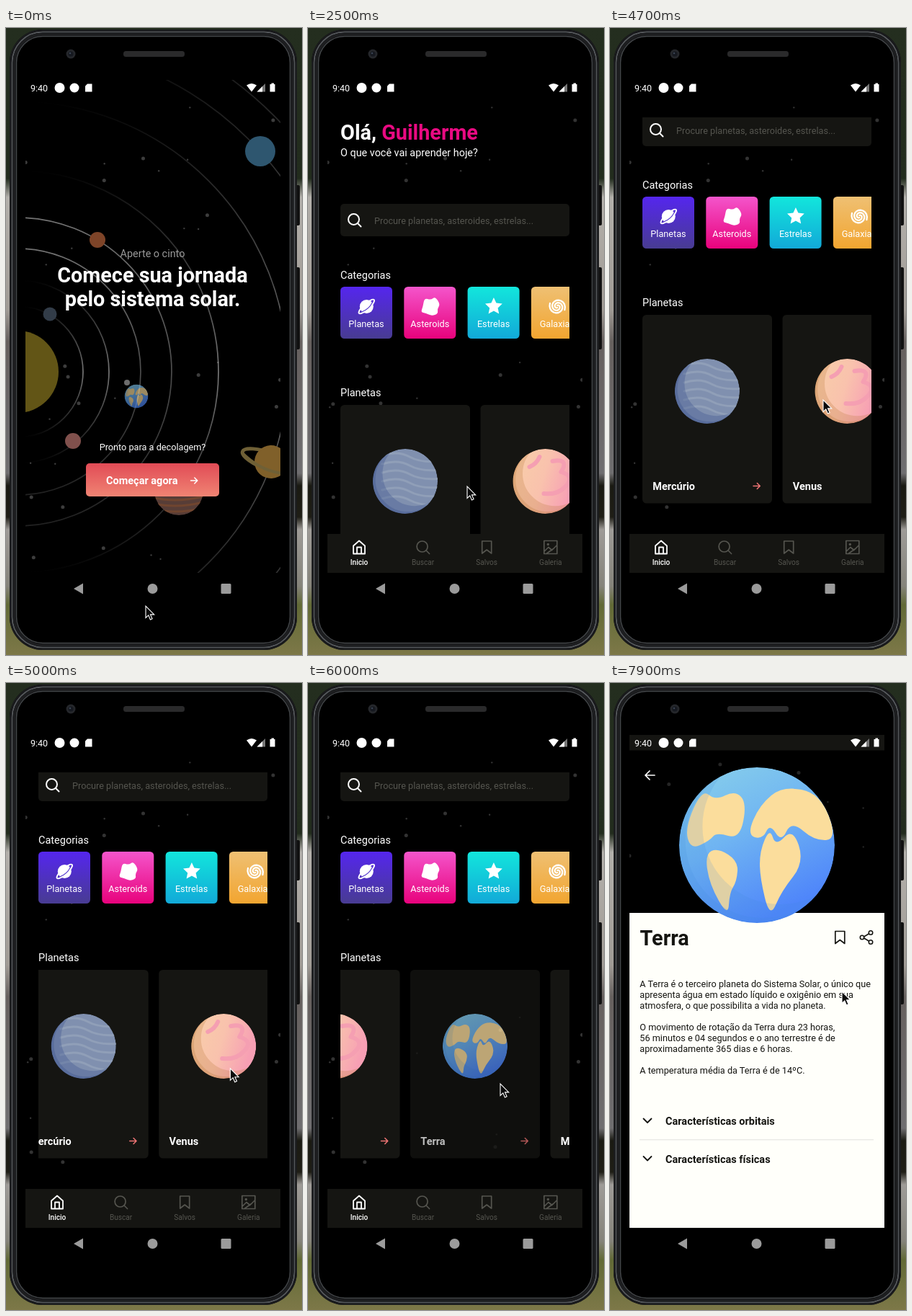
Recreate the animation shown at these times as an HTML page. Size 411 px wide and 870 px high, loop 8 s.

```html
<!DOCTYPE html>
<html lang="pt">
<head>
<meta charset="utf-8">
<title>Sistema solar</title>
<style>
html, body { margin: 0; width: 100%; height: 100%; overflow: hidden; background: #000; }
svg { display: block; width: 411px; height: 870px; font-family: Roboto, "Noto Sans", sans-serif; }
text { white-space: pre; }
</style>
</head>
<body>
<script>
const DARK = '#151512', INK = '#151511', PAPER = '#fffffa', GREY = '#55554f';

// ---------- drawing helpers ----------
const text = (x, y, size, str, fill = '#fff', weight = 400, anchor = 'start') =>
  `<text x="${x}" y="${y}" font-size="${size}" fill="${fill}" font-weight="${weight}" text-anchor="${anchor}">${str}</text>`;
const rect = (x, y, w, h, fill, r = 0, more = '') =>
  `<rect x="${x}" y="${y}" width="${w}" height="${h}" rx="${r}" fill="${fill}" ${more}/>`;
const disc = (x, y, r, fill, more = '') => `<circle cx="${x}" cy="${y}" r="${r}" fill="${fill}" ${more}/>`;
const ring = (x, y, r, color, w, more = '') => disc(x, y, r, 'none', `stroke="${color}" stroke-width="${w}" ${more}`);
const line = (d, color = '#fff', w = 1.8) =>
  `<path d="${d}" fill="none" stroke="${color}" stroke-width="${w}" stroke-linecap="round" stroke-linejoin="round"/>`;
const fill = (d, color) => `<path d="${d}" fill="${color}"/>`;
const at = (x, y, body) => `<g transform="translate(${x} ${y})">${body}</g>`;
const use = (id, x, y, s = 1) => `<use href="#${id}" transform="translate(${x} ${y}) scale(${s})"/>`;
const clip = (id, body) => `<clipPath id="${id}">${body}</clipPath>`;
const grad = (id, stops, more = 'x2="0" y2="1"') => `<linearGradient id="${id}" ${more}>` +
  stops.map(([o, c, a = 1]) => `<stop offset="${o}" stop-color="${c}" stop-opacity="${a}"/>`).join('') + '</linearGradient>';
const repeat = (n, fn) => Array.from({ length: n }, (_, i) => fn(i));

// closed soft outline through the midpoints of a few corners
function blob(str, color) {
  const p = str.split(' ').map(s => s.split(',').map(Number));
  const mid = (a, b) => `${(a[0] + b[0]) / 2} ${(a[1] + b[1]) / 2}`;
  const d = p.map((a, i) => `Q${a} ${mid(a, p[(i + 1) % p.length])}`).join('');
  return fill(`M${mid(p[p.length - 1], p[0])}${d}Z`, color);
}

function stars(n, seed, bottom, color) {
  const next = () => (seed = seed * 16807 % 2147483647) / 2147483647;
  return repeat(n, i => disc(27 + next() * 354, 105 + next() * (bottom - 105), i % 2 ? 1.2 : 2.5, color)).join('');
}

// ---------- planets ----------
// darker crescents on the lower left, as rings around shifted circles
const crescents = (r, color, alpha) => [.08, .3].map(k =>
  ring(r * k, -r * k * .8, r * 1.5, color, r, `opacity="${alpha}"`)).join('');
const LAND = '#fbdd9c';
const earth = `<g id="earth" clip-path="url(#cEarth)">${disc(0, 0, 108, 'url(#gSea)')}
  ${blob('-76,-78 -58,-62 -30,-76 -14,-58 -24,-8 -56,-18 -66,-6 -92,6 -100,-24', LAND)}
  ${blob('-72,12 -54,4 -26,22 -28,50 -38,66 -40,100 -66,54', LAND)}
  ${blob('-14,-14 4,-56 36,-82 88,-72 112,-8 80,-6 48,-34 34,-4 18,-30 8,-8', LAND)}
  ${blob('4,8 18,-24 26,2 50,-24 66,24 34,64 18,102 4,44', LAND)}
  ${crescents(108, '#3d84d8', .15)}</g>`;
const mercury = `<g id="mercury" clip-path="url(#cSmall)">${disc(0, 0, 45, '#8090af')}` +
  repeat(6, i => line(`M-32 ${i * 12 - 36}q22-7 38 2t44 6`, '#909fb8', 3)).join('') +
  crescents(45, '#3c548c', .34) + '</g>';
const venus = `<g id="venus" clip-path="url(#cSmall)">${disc(0, 0, 45, 'url(#gVenus)')}` +
  line('M10-28q24-4 12 15q20 6 6 20q-10 12-30 10M-8-34q-4 10-14 14', '#f59fb2', 6) +
  crescents(45, '#b87a3c', .26) + '</g>';

// ---------- icons ----------
const arrow = (x, y, c, w = 1.5) => at(x, y, line('M-4.5 0H4.5M.8-4 4.8 0 .8 4', c, w));
const lens = (x, y, c, w) => at(x, y, ring(-1, -1, 7.5, c, w) + line('M4.5 4.5 9 9', c, w));
const mark = (x, y, c, w) => at(x, y, line('M-6.5-8.5h13V8.5L0 3.5-6.5 8.5Z', c, w));
const house = line('M-8-2 0-9 8-2V9H-8ZM-3 9V0H3V9');
const picture = line('M-9-9H9V9H-9ZM-9 6-3 0 2 4 9-3M-6 9 4 2', GREY, 1.7) + disc(-3.5, -4, 1.7, GREY);
const share = line('M5-6-5 0 5 6', INK, 1.6) + [[6, -6.5], [-6, 0], [6, 6.5]].map(([x, y]) =>
  disc(x, y, 2.7, PAPER, `stroke="${INK}" stroke-width="1.6"`)).join('');
const polar = (n, step, radius, turn = 0) => 'M' + repeat(n, i => {
  const a = i * step + turn, r = radius(i);
  return `${(r * Math.sin(a)).toFixed(1)} ${(-r * Math.cos(a)).toFixed(1)}`;
}).join('L');
const swirl = turn => line(polar(24, .36, i => 1.5 + i * .42, turn), '#fff', 2.3);
const KINDS = [
  ['Planetas', '#5526ee', '#483c92', disc(0, 0, 9.5, '#fff') +
    '<g transform="rotate(-42)"><ellipse rx="14" ry="4" fill="none" stroke="#fff" stroke-width="2"/>' +
    line('M-9.5 1.2Q0 5 9.5 1.2', '#4c30cc', 1) + '</g>'],
  ['Asteroids', '#f455cb', '#e8027c', blob('-8,-12 1,-9 7,-14 14,-3 10,3 11,10 2,13 -6,9 -13,8 -10,0', '#fff')],
  ['Estrelas', '#12e6dc', '#12a9d8', fill(polar(10, Math.PI / 5, i => i % 2 ? 6 : 12.5) + 'Z', '#fff')],
  ['Galaxias', '#efc073', '#f2a530', swirl(0) + swirl(Math.PI)]
];

// ---------- first screen ----------
const CX = 16, CY = 477;
const orbits = [91, 127, 171, 214, 279, 375, 455, 503].map((r, i) =>
  ring(CX, CY, r, `url(#${i === 2 || i === 3 ? 'gNear' : 'gFade'})`, 1.7)).join('');
const intro = rect(27, 72, 354, 684, '#000') + stars(34, 77, 740, '#3d3d3d') + orbits +
  disc(CX, CY, 57, '#625516') + disc(61, 397, 9.5, '#323c48') + disc(127, 294, 11, '#7e4428') +
  disc(353, 171, 21, '#2e566f') + disc(93, 573, 11, '#80504c') + disc(168, 492, 4, '#6d6d6d') +
  `<g opacity=".62">${use('earth', 181, 511, .152)}</g>` +
  `<g clip-path="url(#cJup)">${disc(240, 642, 34, '#573d37')}${repeat(3, i => line(`M206 ${652 + i * 8}q30 7 68-2`, '#70452f', 3)).join('')}</g>` +
  `<g transform="rotate(20 368 602)"><ellipse cx="368" cy="602" rx="42" ry="12" fill="none" stroke="#6f6036" stroke-width="5"/>
   ${disc(368, 602, 23, '#80602a')}${line('M326 604Q368 624 410 604', '#6f6036', 4)}</g>` +
  text(203.5, 318, 14.4, 'Aperte o cinto', '#999', 400, 'middle') +
  text(203.5, 353, 28.8, 'Comece sua jornada', '#fff', 700, 'middle') +
  text(203.5, 386, 28.8, 'pelo sistema solar.', '#fff', 700, 'middle') +
  text(203.5, 586, 12.7, 'Pronto para a decolagem?', '#fff', 400, 'middle') +
  `<g id="start">${rect(111, 604, 185, 46, 'url(#gStart)', 5)}${text(139, 633, 14.5, 'Começar agora', '#fff', 700)}${arrow(261, 628, '#fff')}</g>`;

// ---------- home screen ----------
const kinds = KINDS.map(([name, , , icon], i) => at(45 + i * 88.3, 359,
  rect(0, 0, 72, 72, `url(#gKind${i})`, 5.5) + at(36.3, 27.5, icon) + text(36, 56, 12.7, name, '#fff', 400, 'middle'))).join('');
const cards = [['Mercúrio', use('mercury', 90, 106)], ['Venus', use('venus', 90, 106)],
  ['Terra', use('earth', 90, 106, 45 / 108)], ['Marte', disc(90, 106, 45, '#e8794a')]].map(([name, art], i) =>
  `<g id="card${i}">` + at(45 + i * 194.5, 523, rect(0, 0, 180, 261.5, DARK, 5.5) + art +
    text(14.3, 243, 14.5, name, '#fff', 700) + arrow(158.5, 237.5, '#ee7474')) + '</g>').join('');
const tabs = [['Inicio', house], ['Buscar', lens(0, 0, GREY, 1.7)], ['Salvos', mark(0, 0, GREY, 1.7)], ['Galeria', picture]]
  .map(([name, icon], i) => at(71 + i * 88.6, 720.5, icon + text(0, 24.5, 10.1, name, i ? GREY : '#fff', i ? 400 : 500, 'middle'))).join('');
const home = rect(27, 72, 354, 684, '#000') + stars(34, 77, 740, '#333') +
  `<g clip-path="url(#cScroll)"><g id="scroll">` +
  text(45, 154.5, 28.8, 'Olá, <tspan fill="#ea0a82">Guilherme</tspan>', '#fff', 700) +
  text(45, 178, 14.4, 'O que você vai aprender hoje?') +
  rect(45, 244, 318, 45, DARK, 5) + lens(64.5, 266.5, '#fff', 2) +
  text(92, 271.5, 12.7, 'Procure planetas, asteroides, estrelas...', GREY) +
  text(45, 347.5, 14.5, 'Categorias') + text(45, 511, 14.5, 'Planetas') +
  `<g clip-path="url(#cList)">${kinds}<g id="slide">${cards}</g></g></g>` +
  '<path id="glow" fill="#fff" opacity=".11"/></g>' + rect(27, 702, 354, 54, DARK) + tabs;

// ---------- planet screen ----------
const story = ['A Terra é o terceiro planeta do Sistema Solar, o único que',
  'apresenta água em estado líquido e oxigênio em sua', 'atmosfera, o que possibilita a vida no planeta.', '',
  'O movimento de rotação da Terra dura 23 horas,', '56 minutos e 04 segundos e o ano terrestre é de',
  'aproximadamente 365 dias e 6 horas.', '', 'A temperatura média da Terra é de 14ºC.'];
const row = (y, str) => line(`M46.5 ${y - 2.5}l5.5 5.5 5.5-5.5`, INK) + text(77, y + 6, 14.5, str, INK, 700);
const detail = rect(27, 72, 354, 684, '#000') + stars(10, 5, 310, '#252525') +
  rect(27, 72, 354, 21.5, DARK) + line('M62 128H49M55 122l-6 6 6 6', '#fff', 1.7) +
  rect(27, 319, 354, 437, PAPER) + use('earth', 204, 225) +
  text(41.5, 364, 28.8, 'Terra', INK, 700) + mark(319.3, 353, INK, 1.7) + at(356, 353, share) +
  story.map((s, i) => text(41.3, 421.5 + i * 15, 12.7, s, INK)).join('') +
  row(607, 'Características orbitais') + rect(41, 633.3, 325, 1, '#e2e2de') + row(659.5, 'Características físicas');

// ---------- phone ----------
const edge = (inset, color, w) => rect(5 + inset, 2 + inset, 399 - 2 * inset, 861 - 2 * inset, 'none', 46 - inset,
  `stroke="${color}" stroke-width="${w}"`);
const phone = rect(0, 0, 411, 870, 'url(#gPhoto)') +
  rect(402, 218, 6, 56, '#111', 2) + rect(402, 332, 6, 114, '#111', 2) +
  rect(5, 2, 399, 861, '#000', 46) + edge(1, '#1b1c1e', 2) + edge(3.5, '#55585c', 2) + edge(6.5, '#1d1e20', 4) + edge(9.5, '#44474a', 1.5) +
  disc(90, 36, 6.5, '#25272b') + disc(90, 36, 3.5, '#15181f') + disc(89, 35, 1.3, '#394251') + rect(163, 32, 85, 8, '#2a2a2b', 3.5);
const status = text(34, 87.5, 12.5, '9:40') + disc(74.5, 83, 7, '#fff') + disc(95, 83, 6.5, '#fff') +
  fill('M113 77.5h6.5V88.5H110V80.5Z', '#fff') + fill('M334 79.5Q341 74.5 348 79.5L341 88.5Z', '#fff') +
  fill('M360 77V88.5H348.5Z', '#777') + fill('M356 81V88.5H348.5Z', '#fff') + fill('M366.5 78h2v-1.5h3.5V78h1.5V88.5h-7Z', '#fff');
const keys = fill('M94 778l13-7.5v15Z', '#9b9b9b') + disc(203.5, 778, 7, '#9b9b9b') + rect(298.5, 771, 14, 14, '#9b9b9b', 1.5);

const defs = grad('gPhoto', [[0, '#242e1f'], [.24, '#222c1d'], [.27, '#b3b0ab'], [.45, '#a09b95'], [.5, '#66605e'],
    [.71, '#6f6e70'], [.73, '#1a1a12'], [.78, '#1f1e16'], [.8, '#9e9b97'], [.89, '#85837a'], [.92, '#626a36'], [1, '#7d7848']]) +
  grad('gFade', [[0, '#fff', 0], [.08, '#fff', .1], [.5, '#fff', .46], [.92, '#fff', .1], [1, '#fff', 0]]) +
  grad('gNear', [[0, '#fff', .45], [.5, '#fff', .3], [1, '#fff', .13]]) +
  grad('gStart', [[0, '#e14b56'], [1, '#f08473']]) + grad('gSea', [[0, '#8ad2ea'], [.5, '#6fb4f2'], [1, '#4f86fa']], 'x2=".5" y2="1"') +
  grad('gVenus', [[0, '#f8cfa8'], [.55, '#f9c2ad'], [1, '#f79fb4']], 'x2="1" y2=".3"') +
  KINDS.map(([, a, b], i) => grad('gKind' + i, [[0, a], [1, b]])).join('') +
  clip('cScreen', rect(27, 72, 354, 684)) + clip('cScroll', rect(27, 124, 354, 578)) + clip('cList', rect(45, 0, 318, 1000)) +
  clip('cHome', rect(27, 72, 354, 684, '#000', 0, 'id="wipeHome"')) + clip('cDetail', rect(27, 72, 354, 684, '#000', 0, 'id="wipeDetail"')) +
  clip('cEarth', disc(0, 0, 108)) + clip('cSmall', disc(0, 0, 45)) + clip('cJup', disc(240, 642, 34)) +
  earth + mercury + venus;

document.body.innerHTML = `<svg viewBox="0 0 411 870"><defs>${defs}</defs>${phone}
  <g clip-path="url(#cScreen)"><g id="intro">${intro}</g>
  <g clip-path="url(#cHome)"><g id="home">${home}</g></g>
  <g clip-path="url(#cDetail)"><g id="detail">${detail}</g></g></g>${status}${keys}
  <path id="cursor" d="M0 0V16.5l3.8-3.6 2.6 6 2.7-1.2-2.6-5.8h5.2Z" fill="#0a0a0a" stroke="#fff" stroke-width="1.1"/></svg>`;

// ---------- motion ----------
const el = id => document.getElementById(id);
const set = (id, name, value) => el(id).setAttribute(name, value);
const move = (id, x, y) => set(id, 'transform', `translate(${x} ${y})`);
const H = 684;

// 0 to 1 between two times, slow at both ends
function smooth(t, from, to) {
  const k = Math.min(1, Math.max(0, (t - from) / (to - from)));
  return k * k * (3 - 2 * k);
}

// pointer strokes: from, to, x, y
const STROKES = [[0, 100, 208, 833], [200, 600, 371, 845], [600, 1100, 221, 636], [2500, 3520, 213, 319], [3520, 3900, 230, 350],
  [4300, 4700, 296, 516], [4700, 4900, 330, 535], [4900, 5400, 151, 533], [5400, 5800, 267, 556], [7000, 7400, 316, 364],
  [7700, 7900, 322, 428]];
const pointer = t => STROKES.reduce(([px, py], [from, to, x, y]) => {
  const k = smooth(t, from, to);
  return [px + (x - px) * k, py + (y - py) * k];
}, [194, 802]);

// cubic-bezier(.35, .45, 0, 1)
function ease(x) {
  if (x <= 0 || x >= 1) return Math.min(1, Math.max(0, x));
  let lo = 0, hi = 1, s;
  for (let i = 0; i < 24; i++) {
    s = (lo + hi) / 2;
    if (1.05 * (1 - s) ** 2 * s + s ** 3 < x) lo = s; else hi = s;
  }
  return 1.35 * (1 - s) ** 2 * s + 3 * (1 - s) * s * s + s ** 3;
}

// the next screen is uncovered from below while the one beneath drifts up
function screens(pHome, pDetail) {
  const shade = p => 1 - .1 * Math.min(1, p / .36);
  move('intro', 0, -.02 * H * pHome);
  set('intro', 'opacity', shade(pHome));
  set('wipeHome', 'y', 72 + H * (1 - pHome));
  move('home', 0, .041 * H * (1 - pHome) - .02 * H * pDetail);
  set('home', 'opacity', shade(pDetail));
  set('wipeDetail', 'y', 72 + H * (1 - pDetail));
  move('detail', 0, .041 * H * (1 - pDetail));
}

function draw(t) {
  screens(ease((t - 1947) / 425), ease((t - 6447) / 425));
  move('scroll', 0, -125 * smooth(t, 2500, 2900));
  move('slide', -292 * smooth(t, 4900, 5430), 0);
  const h = 40 * smooth(t, 2900, 3250) * (1 - smooth(t, 3300, 3900));
  set('glow', 'd', h ? `M27 702V${702 - .3 * h}Q204 ${702 - 1.7 * h} 381 ${702 - .3 * h}V702Z` : '');
  set('start', 'opacity', 1 - .25 * smooth(t, 1200, 1400));
  set('card0', 'opacity', 1 - .13 * (smooth(t, 2500, 2600) - smooth(t, 3200, 3400)));
  set('card2', 'opacity', 1 - .25 * smooth(t, 5900, 6000));
  move('cursor', ...pointer(t));
}

const begin = performance.now();
function tick() {
  const t = (performance.now() - begin) % 8000;
  draw(Math.floor(t / 100) * 100);
  requestAnimationFrame(tick);
}
tick();
</script>
</body>
</html>
```
